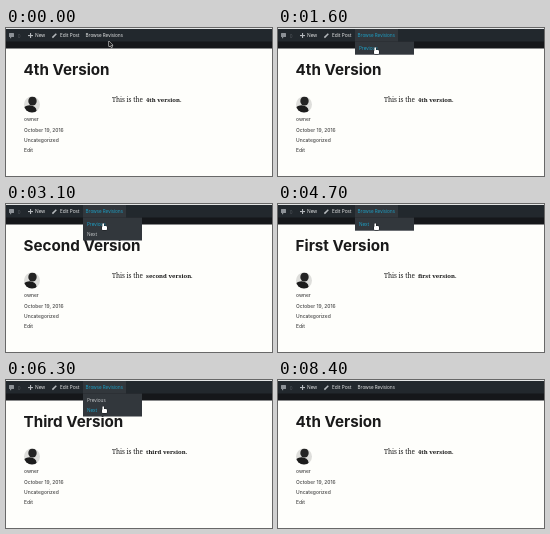
Recreate the animation shown at these times as an HTML page with a canvas. Size 266 by 148 pixels, loop 9300 ms.

```html
<!DOCTYPE html>
<html lang="en">
<head>
<meta charset="utf-8">
<title>Browsing revisions</title>
<style>
  html, body { margin: 0; width: 100%; height: 100%; overflow: hidden; background: #fefefb; }
  canvas { display: block; width: 100%; height: 100%; }
</style>
</head>
<body>
<canvas id="stage"></canvas>
<script>
const W = 266, H = 148, LOOP = 9300;
const OPEN = 300, HOT = 1000, FIRST_CLICK = 2000, CLICK_GAP = 920, CLICKS = 6;
const CLOSE = FIRST_CLICK + CLICK_GAP * (CLICKS - 1);
const LEAVE = 7100, GONE = 7600;
const ROW = 9.8;

const SANS = '"Open Sans", sans-serif';
const GEO = 'Inter, sans-serif';
const SERIF = '"Noto Serif", serif';
const PAGE = '#fefefb', BAR = '#22282d', HOVER = '#32373c', INK = '#1a1a1a';
const LIGHT = '#eceded', ICON = '#b5b9bd', CYAN = '#1ca3ca';
const ORDINALS = ['First', 'Second', 'Third', '4th'];

const canvas = document.getElementById('stage');
const ctx = canvas.getContext('2d');

const clamp = (v, lo, hi) => Math.min(hi, Math.max(lo, v));

// Eased progress from 0 to 1 between two times
function glide(t, from, to) {
  const k = clamp((t - from) / (to - from), 0, 1);
  return k * k * (3 - 2 * k);
}

// Three clicks go back to the first version, three more return to the last
function stateAt(t) {
  const step = clamp(Math.floor((t - FIRST_CLICK) / CLICK_GAP) + 1, 0, CLICKS);
  const version = Math.abs(step - 3);
  const items = [];
  if (version > 0) items.push('Previous');
  if (version < 3) items.push('Next');
  return {
    title: ORDINALS[version],
    open: t >= OPEN && t < CLOSE,
    items,
    hot: t < HOT ? '' : step < 3 ? 'Previous' : 'Next'
  };
}

function text(str, x, y, size, family, color, weight = 400) {
  ctx.font = `${weight} ${size}px ${family}`;
  ctx.fillStyle = color;
  ctx.fillText(str, x, y);
  return x + ctx.measureText(str).width;
}

function rect(x, y, w, h, color) {
  ctx.fillStyle = color;
  ctx.fillRect(x, y, w, h);
}

function ellipse(x, y, rx, ry, color) {
  ctx.beginPath();
  ctx.ellipse(x, y, rx, ry, 0, 0, Math.PI * 2);
  ctx.fillStyle = color;
  ctx.fill();
}

function outlined(path, fill, edge, width) {
  ctx.lineWidth = width;
  ctx.strokeStyle = edge;
  ctx.stroke(path);
  ctx.fillStyle = fill;
  ctx.fill(path);
}

function drawAvatar() {
  ctx.save();
  ctx.beginPath();
  ctx.arc(26, 76.5, 8, 0, Math.PI * 2);
  ctx.clip();
  rect(18, 68, 16, 17, '#dededb');
  ellipse(26.5, 73, 4.2, 4.6, '#242424');
  ellipse(23.5, 82.5, 7, 5.2, '#1c1c1c');
  ctx.restore();
}

function drawPage(title) {
  rect(0, 0, W, H, PAGE);
  text(title + ' Version', 17.6, 47, 15.2, GEO, INK, 700);
  drawAvatar();
  text('This is the', 106, 74, 6.4, SERIF, INK);
  const end = text(title.toLowerCase() + ' version', 140, 74, 5.95, SERIF, INK, 700);
  text('.', end, 74, 6.2, SERIF, INK);
  ['owner', 'October 19, 2016', 'Uncategorized', 'Edit'].forEach((line, i) =>
    text(line, 18, 93.3 + i * 10.35, 4.95, GEO, '#444', 500));
}

function drawIcons() {
  ctx.fillStyle = '#8d9297';
  ctx.beginPath();
  ctx.roundRect(3, 5, 5, 4, 0.6);
  ctx.rect(4, 9, 1.2, 1.2);
  ctx.fill();

  rect(22, 7, 5, 1.1, ICON);
  rect(24, 5, 1.1, 5, ICON);

  ctx.strokeStyle = ICON;
  ctx.lineWidth = 1.5;
  ctx.beginPath();
  ctx.moveTo(46.4, 9.6);
  ctx.lineTo(50.3, 5.7);
  ctx.stroke();
}

function drawBar(open) {
  rect(0, 0, W, 20.5, '#15171a');
  rect(0, 1, W, 12.5, BAR);
  rect(0, 0, W, 1, '#e4e6e6');
  if (open) rect(77, 1, 43, 12.5, HOVER);
  drawIcons();
  text('0', 11.7, 9.6, 4.8, SANS, '#555b60');
  text('New', 29, 9.4, 4.9, SANS, LIGHT, 500);
  text('Edit Post', 54, 9.4, 4.8, SANS, LIGHT, 500);
  text('Browse Revisions', 79.6, 9.4, 4.65, SANS, open ? CYAN : LIGHT, 500);
}

function drawMenu({ items, hot }) {
  rect(77, 13.5, 59, 3.4 + items.length * ROW, HOVER);
  items.forEach((item, i) =>
    text(item, 81, 22 + i * ROW, 4.7, SANS, item === hot ? CYAN : '#c8cbcd', 500));
}

function drawHand() {
  const hand = new Path2D();
  hand.roundRect(-0.6, 0, 1.6, 5, 0.8);
  hand.roundRect(-1, 2.8, 5, 4, 1.2);
  outlined(hand, '#fff', '#15171a', 0.8);
}

function drawArrow() {
  const arrow = new Path2D('M0 0V5.6L1.4 4.4L2.4 6.6L3.2 6.2L2.3 4.1H4Z');
  outlined(arrow, '#222', '#f4f4f4', 1);
}

function drawPointer(t, open) {
  if (t >= GONE) return;
  const toLink = glide(t, HOT, HOT + 100);
  const away = glide(t, CLOSE, CLOSE + 300);
  const exit = glide(t, LEAVE, GONE);
  const x = 103 - 6 * toLink - 4 * away + 15 * exit;
  const y = 13 - 5 * glide(t, 100, 500) + 11.3 * toLink
    + 7 * glide(t, 4760, 5200) + 1.7 * away + 88 * exit;
  ctx.save();
  ctx.translate(x, y);
  open ? drawHand() : drawArrow();
  ctx.restore();
}

function draw(t) {
  const dpr = window.devicePixelRatio || 1;
  const w = Math.round(innerWidth * dpr), h = Math.round(innerHeight * dpr);
  if (canvas.width !== w || canvas.height !== h) {
    canvas.width = w;
    canvas.height = h;
  }
  ctx.setTransform(w / W, 0, 0, h / H, 0, 0);
  const state = stateAt(t);
  drawPage(state.title);
  drawBar(state.open);
  if (state.open) drawMenu(state);
  drawPointer(t, state.open);
}

const start = performance.now();
function tick() {
  draw((performance.now() - start) % LOOP);
  requestAnimationFrame(tick);
}
tick();
</script>
</body>
</html>
```
